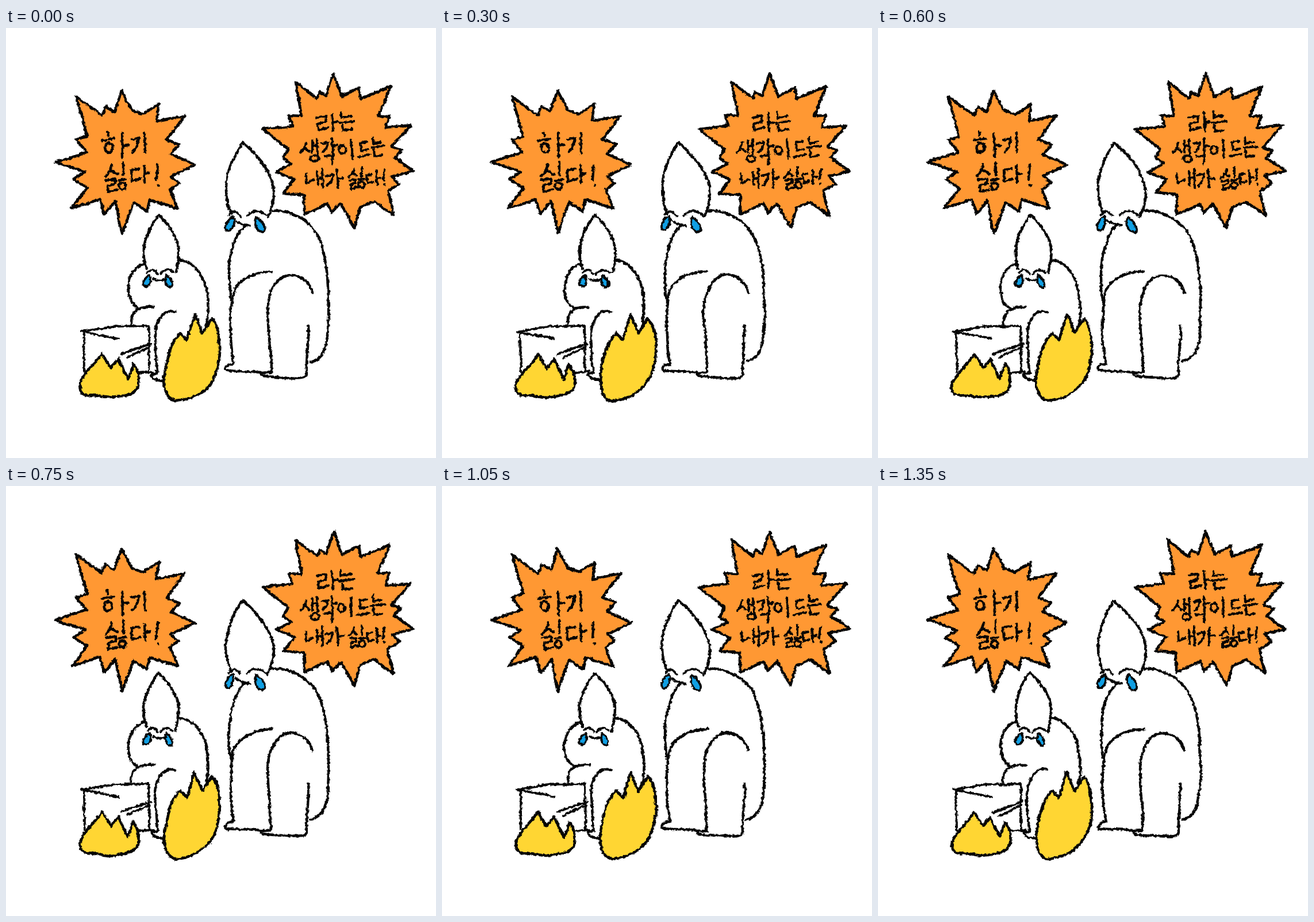
Animation of 748x748 px, one loop 1500 ms. Source, as an HTML page:

```html
<!DOCTYPE html>
<html lang="ko">
<head>
<meta charset="utf-8">
<title>하기 싫다!</title>
<style>
  html, body { margin: 0; width: 100%; height: 100%; overflow: hidden; background: #fff; }
  svg { display: block; width: 100vw; height: 100vh; }
  path { fill: none; stroke: #050505; stroke-width: 4.4; stroke-linecap: round; stroke-linejoin: round; }
  .burst path { fill: #ff9833; stroke-width: 4.6; }
  .flame path { fill: #ffd633; stroke-width: 4.6; }
  .tear path { fill: #109fe3; stroke-width: 3.8; }
  .paper { fill: #fff; }
  .face path { stroke-width: 3.8; }
  .words path { stroke-width: 4.3; }
  .small path { stroke-width: 4; }
</style>
</head>
<body>
<svg viewBox="0 0 748 748" role="img" aria-label="하기 싫다! 라는 생각이 드는 내가 싫다!">
  <defs>
    <filter id="crayon" filterUnits="userSpaceOnUse" x="0" y="0" width="748" height="748" color-interpolation-filters="sRGB">
      <feTurbulence id="sway" type="fractalNoise" baseFrequency=".025" numOctaves="1" seed="1" result="slow"/>
      <feDisplacementMap in="SourceGraphic" in2="slow" scale="4.5" xChannelSelector="R" yChannelSelector="G" result="bent"/>
      <feTurbulence id="grain" type="fractalNoise" baseFrequency=".2" numOctaves="2" seed="21" result="fast"/>
      <feDisplacementMap in="bent" in2="fast" scale="5" xChannelSelector="R" yChannelSelector="G"/>
    </filter>
  </defs>

  <g filter="url(#crayon)">
    <!-- large figure -->
    <g>
      <path d="M464 318C490 316 525 331 541 360C560 396 561 450 561 500C560 558 553 576 530 580"/>
      <path d="M418 342C397 358 388 393 388 430C388 450 390 465 391 473"/>
      <path d="M462 423C430 424 401 436 395 465C388 500 390 558 397 584C381 583 378 598 389 596C402 598 425 596 442 599"/>
      <path d="M461 599C461 560 455 522 455 490C457 450 476 430 495 430C515 430 529 444 533 460"/>
      <path d="M460 599L444 600C440 607 462 606 490 609C506 610 523 611 523 602C521 578 528 545 526 518"/>
      <path class="paper" d="M392 323C387 312 383 300 383 283C382 252 396 222 411 199C438 222 467 255 466 288C466 304 461 317 455 328"/>
    </g>
    <g class="face">
      <path d="M388 325Q398 312 408 328M420 327Q434 311 452 325M400 335Q410 343 424 344"/>
    </g>
    <g class="tear">
      <path d="M395 328C387 329 379 345 383 351C389 358 400 341 395 328Z"/>
      <path d="M435 329C430 340 436 355 446 355C455 354 449 337 435 329Z"/>
    </g>

    <!-- small figure -->
    <g>
      <path d="M240 410C220 417 212 437 213 458C214 473 220 481 228 486"/>
      <path d="M302 404C326 405 344 430 349 458C353 480 352 502 348 520"/>
      <path d="M218 515C217 493 229 483 257 486"/>
      <path d="M294 494C271 487 258 515 259 540C261 570 261 588 264 600L254 602C252 609 264 612 278 614"/>
      <path class="paper" d="M244 419C240 408 239 397 240 382C243 358 253 340 265 325C284 343 301 364 301 386C301 403 298 415 296 426"/>
    </g>
    <g class="face">
      <path d="M246 425Q255 415 264 428M269 428Q279 415 291 426M257 436Q267 441 278 437"/>
    </g>
    <g class="tear">
      <path d="M250 430C243 433 235 444 240 448C247 454 255 444 250 430Z"/>
      <path d="M279 430C274 441 280 451 286 451C293 448 288 437 279 430Z"/>
    </g>

    <!-- box -->
    <g class="small">
      <path class="paper" d="M136 531L192 519L248 518L248 596L232 600L137 598Z" style="stroke:none"/>
      <path d="M196 541L131 528L192 519L248 518L249 596M136 532L137 598"/>
      <path d="M201 567L252 549M211 573L250 555M230 600L256 598"/>
    </g>

    <g class="flame">
      <path d="M133 611C141 595 158 584 167 567L182 591L195 575L212 611L221 584C229 594 232 606 230 622C228 636 206 641 180 643C166 642 157 638 149 639C127 642 125 624 133 611Z"/>
      <path d="M303 530L315 542L328 498L342 531L358 505C372 520 376 560 368 590C360 625 331 646 295 649C277 645 272 620 277 595C281 565 290 542 303 530Z"/>
    </g>

    <g class="burst">
      <path d="M201 109L219 143L238 150L266 132L262 162L311 152L279 194L302 203L287 219L329 238L287 258L300 270L285 281L298 314L250 298L245 319L222 303L202 357L190 301L171 324L163 298L114 313L141 278L118 264L137 250L86 233L139 216L122 194L141 188L122 119L167 152L174 137L189 146Z"/>
      <path d="M570 79L585 119L614 104L617 123L668 102L647 153L667 152L660 173L704 169L670 207L687 213L676 226L709 249L672 257L684 271L664 284L674 326L640 302L616 312L606 347L583 306L567 322L560 305L519 324L519 290L483 287L501 263L470 250L497 236L483 227L491 211L447 176L498 170L492 152L514 153L504 94L541 123L545 112L557 118Z"/>
    </g>

    <!-- 하기 / 싫다! -->
    <g class="words">
      <path d="M177 181L178 188M167 196L188 193M178 201a7 8 0 1 0 1 0M202 183L203 224M204 204L213 203"/>
      <path d="M218 194L231 191Q230 206 220 216M241 183L242 217"/>
      <path d="M184 238Q181 251 173 258M181 247L194 254M204 234L204 256M174 264L190 262L190 270L177 274L178 285L193 281M197 265L208 263M202 269a6 6 0 1 0 1 0"/>
      <path d="M232 245L218 247L219 267L234 263M241 240L242 269M243 254L250 253M264 238L262 264M266 273L266 274"/>
    </g>

    <!-- 라는 / 생각이 드는 / 내가 싫다! -->
    <g class="words small">
      <path d="M541 156L557 153L556 163L543 167L544 178L561 173M567 148L569 179M570 164L577 163"/>
      <path d="M583 146L583 156L601 153M580 165L606 162M585 169L586 179L602 177"/>
      <path d="M522 199Q520 211 513 217M520 208L528 215M533 196L533 217M533 206L540 205M541 194L542 220M537 222a7 5.5 0 1 0 1 0"/>
      <path d="M549 201L560 199Q559 210 551 216M567 193L568 218M568 205L576 204M554 223L568 221L567 237"/>
      <path d="M584 205a6 7 0 1 0 1 0M600 194L602 227"/>
      <path d="M628 197L616 199L617 213L630 211M612 224L633 220"/>
      <path d="M638 190L639 201L653 198M636 208L659 206M640 212L641 224L655 222"/>
      <path d="M521 254L522 270L534 264M541 250L542 273M542 262L549 261M550 245L551 278"/>
      <path d="M556 257L568 254Q567 267 558 274M575 246L577 277M577 262L586 261"/>
      <path d="M606 246Q603 256 596 261M603 253L611 258M619 242L619 259M598 266L609 264L609 270L600 273L600 281L612 277M614 265L625 263M619 268a5.5 5.5 0 1 0 1 0"/>
      <path d="M637 254L628 256L630 270L640 267M645 248L646 272M647 260L652 260M659 246L657 264M659 271L659 272"/>
    </g>
  </g>
</svg>
<script>
  const POSE_MS = 150, POSES = 10;
  const sway = document.getElementById('sway');
  const grain = document.getElementById('grain');
  let shown = -1;

  // Each pose redraws the same lines with a fresh hand tremor.
  function draw() {
    const pose = Math.floor(performance.now() / POSE_MS) % POSES;
    if (pose !== shown) {
      sway.setAttribute('seed', pose + 1);
      grain.setAttribute('seed', pose + 21);
      shown = pose;
    }
    requestAnimationFrame(draw);
  }
  draw();
</script>
</body>
</html>
```
